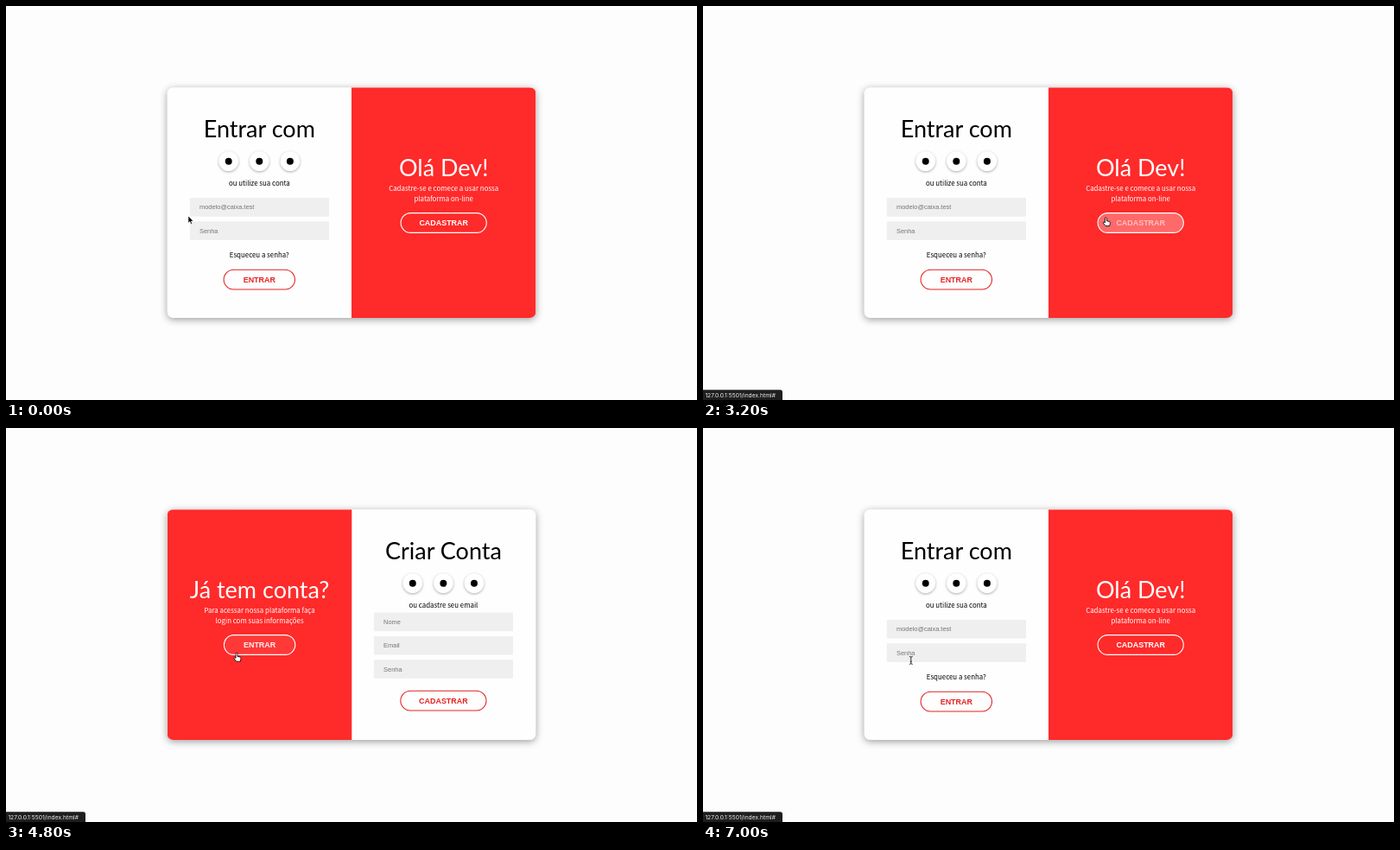
Animation of 800 by 456 pixels, one loop 7100 ms. Source, as an HTML page:

```html
<!DOCTYPE html>
<html lang="pt-BR">
<head>
<meta charset="utf-8">
<title>Login e cadastro</title>
<style>
  html, body { margin: 0; width: 100%; height: 100%; overflow: hidden; background: #fdfdfd; }
  svg { display: block; width: 800px; height: 456px; }
  text { text-anchor: middle; }
  .title { font: 27px Lato, sans-serif; }
  .body { font: 7.9px "Noto Sans CJK JP", "Noto Sans CJK SC", "Noto Sans CJK", sans-serif; }
  .field { font: 7.45px "Liberation Sans", Arial, sans-serif; fill: #757575; text-anchor: start; }
  .label { font: bold 8.95px "Liberation Sans", Arial, sans-serif; }
  .status { font: 6.7px Inter, sans-serif; fill: #f1f1f1; text-anchor: start; }
  .pill { stroke-width: 1.1px; }
  .card { fill: #fefefe; filter: drop-shadow(0 2.5px 4.5px rgba(0, 0, 0, .38)); }
  .disc { fill: #fff; filter: drop-shadow(0 1.6px 1.4px rgba(0, 0, 0, .32)); }
</style>
</head>
<body>
<svg id="stage" viewBox="0 0 800 456"></svg>
<script>
const RED = '#ff2a2a', BUTTON_RED = '#e52222';
const LOOP = 7100, STEP = 100;
const CARD = { x: 186.6, y: 94.3, w: 426.8, h: 266.8 };
const HALF = CARD.w / 2;
const MID = CARD.x + HALF / 2;

const text = (cls, x, y, str, fill = '#000') =>
  `<text class="${cls}" x="${x}" y="${y}" fill="${fill}">${str}</text>`;

const field = (y, str) =>
  `<rect x="212.8" y="${y}" width="161.2" height="21.6" fill="#efefef"/>` +
  `<text class="field" x="224" y="${y + 13.4}">${str}</text>`;

const button = (y, w, str, color, id = '') =>
  `<g id="${id}"><rect class="pill" x="${MID - w / 2}" y="${y}" width="${w}" height="22.8" rx="11.4"
    fill="#fff" fill-opacity="0" stroke="${color}"/>${text('label', MID, y + 14.6, str, color)}</g>`;

const icons = prefix => [-35.6, 0, 35.6].map((dx, i) =>
  `<circle class="disc" id="${prefix}${i}" cx="${MID + dx}" cy="179.6" r="11.4"/>
   <circle cx="${MID + dx}" cy="179.8" r="4"/>`).join('');

const form = (id, title, hint, rest) =>
  `<g id="${id}">${text('title', MID, 152.4, title)}${icons(id)}${text('body', MID, 208.2, hint)}${rest}</g>`;

const message = (id, title, lines, action) =>
  `<g id="${id}">${text('title', MID, 196.8, title, '#fff')}` +
  lines.map((line, i) => text('body', MID, 213.9 + i * 11.8, line, '#fff')).join('') + action + '</g>';

document.getElementById('stage').innerHTML = `
  <clipPath id="clip"><rect x="${CARD.x}" y="${CARD.y}" width="${CARD.w}" height="${CARD.h}" rx="7"/></clipPath>
  <rect class="card" x="${CARD.x}" y="${CARD.y}" width="${CARD.w}" height="${CARD.h}" rx="7"/>
  <g clip-path="url(#clip)">
    <g id="forms">
      ${form('signup', 'Criar Conta', 'ou cadastre seu email',
        field(213.6, 'Nome') + field(240.9, 'Email') + field(268.2, 'Senha') +
        button(304.2, 99.2, 'CADASTRAR', BUTTON_RED))}
      ${form('signin', 'Entrar com', 'ou utilize sua conta',
        field(222, 'modelo@caixa.test') + field(249.3, 'Senha') +
        text('body', MID, 291, 'Esqueceu a senha?') +
        button(305.2, 82.4, 'ENTRAR', BUTTON_RED))}
    </g>
    <g id="panel">
      <rect x="${CARD.x}" y="${CARD.y}" width="${HALF}" height="${CARD.h}" fill="${RED}"/>
      ${message('welcome', 'Olá Dev!', ['Cadastre-se e comece a usar nossa', 'plataforma on-line'],
        button(239.6, 99.2, 'CADASTRAR', '#fff', 'goSignup'))}
      ${message('back', 'Já tem conta?', ['Para acessar nossa plataforma faça', 'login com suas informações'],
        button(239.6, 82.4, 'ENTRAR', '#fff', 'goSignin'))}
    </g>
  </g>
  <g id="status">
    <path id="statusBox" fill="#1e1e1e"/>
    <text id="statusText" class="status" x="2.4" y="452.6"></text>
  </g>
  <g id="cursor" stroke-linejoin="round">
    <path id="arrow" d="M0 0V8.2L1.9 6.5 3.2 9.4 4.6 8.8 3.4 6H6Z" stroke="#fff" stroke-width=".6"/>
    <path id="hand" d="M-1 .9a1 1 0 0 1 2 0V4l3 .6q1.2 .3 1 1.7L4.4 9.8H-.4L-3.2 6.1q.2-1.3 1.4-.7L-1 6.2Z"
      fill="#fff" stroke="#111" stroke-width=".9"/>
    <path id="beam" d="M-1.9 0Q0 0 0 1.2Q0 0 1.9 0M0 1V8M-1.9 9Q0 9 0 7.8Q0 9 1.9 9M-1 5.8H1"
      fill="none" stroke="#222" stroke-width=".9"/>
  </g>`;

const el = Object.fromEntries([...document.querySelectorAll('[id]')].map(node => [node.id, node]));
const clamp = v => Math.min(1, Math.max(0, v));

// CSS "ease": cubic-bezier(.25, .1, .25, 1)
function ease(x) {
  if (x <= 0) return 0;
  if (x >= 1) return 1;
  let lo = 0, hi = 1;
  for (let i = 0; i < 24; i++) {
    const s = (lo + hi) / 2;
    if (.75 * s * (1 - s) + s ** 3 < x) lo = s; else hi = s;
  }
  const r = 1 - lo;
  return .3 * r * r * lo + 3 * r * lo * lo + lo ** 3;
}

const pulse = (t, on, off, duration = 500) => ease((t - on) / duration) - ease((t - off) / duration);

// [time, x, y] of the pointer's hot spot
const route = [
  [0, 211, 243], [100, 211.4, 239], [200, 211.4, 239], [500, 254, 184], [700, 257, 176],
  [1100, 257, 176], [1400, 292.6, 176], [1850, 294, 177], [2100, 327, 177], [2500, 328.5, 176],
  [2600, 328.5, 176], [3100, 461, 245], [3200, 466.4, 244.8], [4200, 466.6, 245.6],
  [4700, 275, 264], [4800, 267, 260.4], [5000, 267, 256], [5500, 268, 254.6], [6000, 268.5, 254.8],
  [6800, 271, 256], [6900, 271, 256], [7000, 240.8, 264.4]
];

function pointer(t) {
  const i = route.findIndex(key => key[0] > t);
  if (i < 0) return route.at(-1).slice(1);
  const [t0, x0, y0] = route[i - 1], [t1, x1, y1] = route[i];
  const k = (t - t0) / (t1 - t0);
  return [x0 + (x1 - x0) * k, y0 + (y1 - y0) * k];
}

// The last entry whose start time has passed
const current = (list, t) => list.filter(([start]) => start <= t).at(-1)[1];

const shapes = [[0, 'arrow'], [500, 'hand'], [2700, 'arrow'], [3100, 'hand'],
  [4300, 'arrow'], [4750, 'hand'], [6000, 'beam']];
const statuses = [[0, ''], [700, 'https://gmail.com'], [2800, ''], [3100, '127.0.0.1:5501/index.html#']];
const statusWidth = { 'https://gmail.com': 62, '127.0.0.1:5501/index.html#': 92 };

const slide = (node, dx) => node.setAttribute('transform', `translate(${dx} 0)`);

function tint(disc, level) {
  const c = 255 - 213 * level;
  disc.setAttribute('fill', '#fff');
  disc.style.fill = `rgb(255 ${c} ${c})`;
}

function highlight(node, level) {
  const [pill, label] = node.children;
  const c = 255 - 213 * level;
  pill.setAttribute('fill-opacity', level);
  label.setAttribute('fill', `rgb(255 ${c} ${c})`);
}

function draw(t) {
  const p = pulse(t, 3850, 5616, 1000);
  slide(el.forms, HALF * p);
  slide(el.panel, HALF * (1 - p));
  el.signin.setAttribute('opacity', 1 - p);
  el.signup.setAttribute('opacity', p);

  // On the way back the messages swap a little later than the forms
  const swap = t < 5616 ? p : clamp(p / .7);
  el.welcome.setAttribute('opacity', 1 - swap);
  el.back.setAttribute('opacity', swap);

  tint(el.signin0, pulse(t, 520, 1172));
  tint(el.signin1, pulse(t, 1260, 1950));
  tint(el.signin2, pulse(t, 2020, 2680));
  highlight(el.goSignup, pulse(t, 3100, 4110));
  highlight(el.goSignin, pulse(t, 4760, 5750));

  const url = current(statuses, t);
  el.status.setAttribute('visibility', url ? 'visible' : 'hidden');
  el.statusText.textContent = url;
  el.statusBox.setAttribute('d', `M0 444.2H${(statusWidth[url] || 3) - 2.5}q2.5 0 2.5 2.5V456H0Z`);

  const shape = current(shapes, t);
  for (const name of ['arrow', 'hand', 'beam']) {
    el[name].setAttribute('visibility', name === shape ? 'visible' : 'hidden');
  }
  el.cursor.setAttribute('transform', `translate(${pointer(t)})`);
}

const start = performance.now();
function tick() {
  const t = (performance.now() - start) % LOOP;
  draw(Math.floor(t / STEP) * STEP);
  requestAnimationFrame(tick);
}
tick();
</script>
</body>
</html>
```
